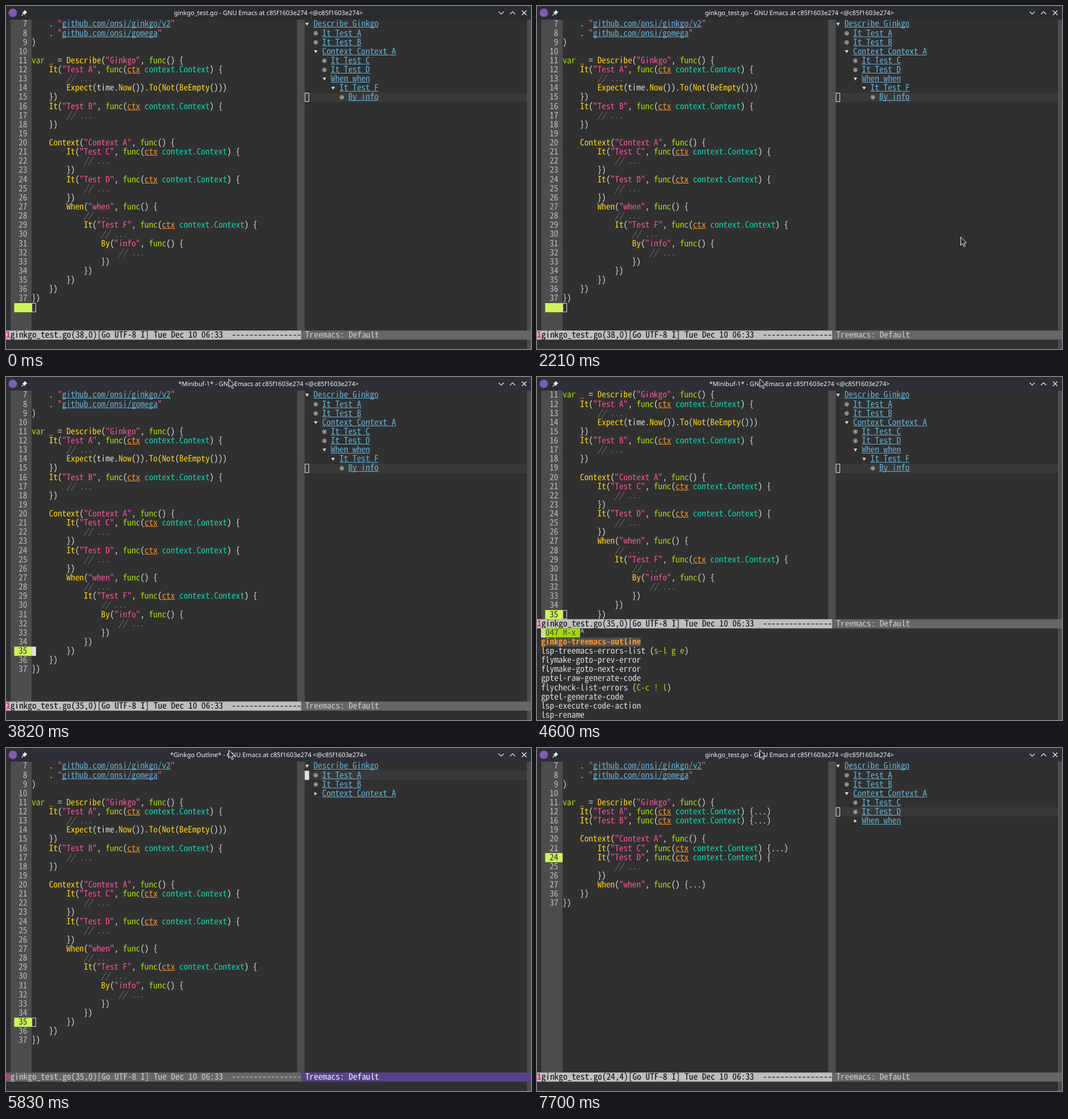
Recreate the animation shown at these times as an HTML page with a canvas. Size 925 by 605 pixels, loop 8000 ms.

```html
<!DOCTYPE html>
<html lang="en">
<head>
<meta charset="utf-8">
<title>Ginkgo outline</title>
<style>
html, body { margin: 0; width: 100%; height: 100%; overflow: hidden; background: #303030; }
canvas { display: block; }
</style>
</head>
<body>
<canvas id="stage" width="925" height="605"></canvas>
<script>
const g = document.getElementById('stage').getContext('2d');
g.textRendering = 'geometricPrecision';

const LOOP = 8000, CW = 7.65, RH = 16.13, TOP = 24;
const CODE_X = 45.2, TREE_X = 526.4, MINI_X = 7.2;
const C = {
  bg: '#303030', bar: '#4d4d4d', hl: '#393939', text: '#dcdcdc', num: '#bcbcbc',
  lime: '#a2dc04', gold: '#ffd60a', pink: '#ff4f9f', orange: '#ff9020',
  teal: '#06d9ae', blue: '#62b2da', comment: '#767676', cursor: '#e4e4e4',
  current: '#cdf652', active: '#bebebe', idle: '#666666', purple: '#58428f'
};
const MONO = '"Noto Sans Mono CJK JP", "Noto Sans Mono CJK SC", "Noto Sans Mono", monospace';
g.font = `100px ${MONO}`;
const SIZE = 100 * CW / g.measureText('M').width;

const FIRST = 7, FOLDED = [12, 16, 21, 27];
const code = `    . "github.com/onsi/ginkgo/v2"
    . "github.com/onsi/gomega"
)

var _ = Describe("Ginkgo", func() {
    It("Test A", func(ctx context.Context) {
        // ...
        Expect(time.Now()).To(Not(BeEmpty()))
    })
    It("Test B", func(ctx context.Context) {
        // ...
    })

    Context("Context A", func() {
        It("Test C", func(ctx context.Context) {
            // ...
        })
        It("Test D", func(ctx context.Context) {
            // ...
        })
        When("when", func() {
            // ...
            It("Test F", func(ctx context.Context) {
                // ...
                By("info", func() {
                    // ...
                })
            })
        })
    })
})`.split('\n');

// depth, icon, label
const A = [1, 'o', 'It Test A'], B = [1, 'o', 'It Test B'];
const CC = [2, 'o', 'It Test C'], D = [2, 'o', 'It Test D'];
const root = open => [0, open, 'Describe Ginkgo'];
const ctxNode = open => [1, open, 'Context Context A'];
const whenNode = open => [2, open, 'When when'];
const trees = {
  full: [root('v'), A, B, ctxNode('v'), CC, D, whenNode('v'), [3, 'v', 'It Test F'], [4, 'o', 'By info']],
  closed: [root('>')],
  top: [root('v'), A, B, ctxNode('>')],
  inner: [root('v'), A, B, ctxNode('v'), CC, D, whenNode('>')]
};
const candidates = [
  'ginkgo-treemacs-outline', 'lsp-treemacs-errors-list (s-l g e)', 'flymake-goto-prev-error',
  'flymake-goto-next-error', 'gptel-raw-generate-code', 'flycheck-list-errors (C-c ! l)',
  'gptel-generate-code', 'lsp-execute-code-action', 'lsp-rename'
];

const rowY = row => TOP + row * RH;
const between = (t, a, b) => t >= a && t < b;
// Latest value whose start time has passed.
const at = (t, steps) => steps.filter(s => s[0] <= t).pop()[1];

function box(x, y, w, h, color) {
  g.fillStyle = color;
  g.fillRect(x, y, w, h);
}

const band = (x, row, w, color) => box(x, rowY(row), w, RH, color);

function put(text, x, row, color, { style = '', underline = false } = {}) {
  const y = rowY(row) + 12.4;
  g.font = `${style} ${SIZE}px ${MONO}`;
  g.fillStyle = color;
  [...text].forEach((ch, i) => ch !== ' ' && g.fillText(ch, x + i * CW, y));
  if (underline) g.fillRect(x, Math.round(y + 1), text.length * CW, 1);
}

function cursor(x, row, kind, ch = ' ') {
  if (kind === 'solid') {
    band(x, row, CW, C.cursor);
    put(ch, x, row, C.bg);
  } else if (kind === 'hollow') {
    g.strokeStyle = C.cursor;
    g.lineWidth = 1;
    g.strokeRect(x + .5, rowY(row) + .5, CW - 1, RH - 1);
  }
}

function line(points, color, width) {
  g.beginPath();
  points.forEach(([x, y]) => g.lineTo(x, y));
  g.strokeStyle = color;
  g.lineWidth = width;
  g.stroke();
}

function poly(points, color) {
  g.beginPath();
  points.forEach(([x, y]) => g.lineTo(x, y));
  g.closePath();
  g.fillStyle = color;
  g.fill();
}

function codeLine(text, row) {
  const tokens = /\/\/.*|"[^"]*"|context\.Context|\w+|\s+|[^\w\s]/g;
  for (const m of text.matchAll(tokens)) {
    const s = m[0], x = CODE_X + m.index * CW;
    if (s.startsWith('//')) put(s, x, row, C.comment, { style: 'italic' });
    else if (s.startsWith('"')) {
      const link = s.includes('/');
      put(link ? '"' + ' '.repeat(s.length - 2) + '"' : s, x, row, C.pink);
      if (link) put(s.slice(1, -1), x + CW, row, C.blue, { underline: true });
    }
    else if (s === 'var' || s === 'func') put(s, x, row, C.lime);
    else if (s === 'ctx') put(s, x, row, C.orange, { underline: true });
    else if (s === '_') put(s, x, row, C.orange);
    else if (s === 'context.Context') put(s, x, row, C.teal);
    else if (/^\w/.test(s) && text[m.index + s.length] === '(') put(s, x, row, C.gold);
    else put(s, x, row, C.text);
  }
}

function editor(t, modeRow) {
  const current = at(t, [[0, 38], [3260, 37], [3450, 36], [3640, 35], [7240, 24]]);
  const kind = at(t, [[0, 'hollow'], [2460, 'solid'], [2960, ''], [3260, 'solid'],
    [3870, 'hollow'], [7240, 'solid'], [7700, '']]);
  const folded = t >= 7240;
  const hidden = n => folded && (between(n, 13, 16) || n === 17 || n === 18 ||
    n === 22 || n === 23 || between(n, 28, 36));
  const start = modeRow < 34 ? 11 : FIRST;

  box(8, TOP, 37, rowY(modeRow) - TOP, C.bar);
  let row = 0;
  for (let n = start; n <= 38 && row < modeRow; n++) {
    if (hidden(n)) continue;
    const text = code[n - FIRST] || '';
    if (n === current) band(14.4, row, 30.8, C.current);
    if (n < 38) put(String(n).padStart(2), 22.2, row, n === current ? '#303030' : C.num);
    // Matching braces of the outer block
    if (between(t, 3390, 3450) && (n === 11 || n === 37))
      band(CODE_X + (n === 11 ? 34 : 0) * CW, row, CW, '#5f5f5f');
    codeLine(folded && FOLDED.includes(n) ? text + '...)' : text, row);
    if (n === current) {
      const col = n === 24 ? 4 : 0;
      cursor(CODE_X + col * CW, row, kind, text[col]);
    }
    row++;
  }

  const on = !between(t, 4650, 7240), ink = on ? '#080808' : '#cecece';
  const pos = current === 24 ? '24,4' : current + ',0';
  band(0, modeRow, 520, on ? C.active : C.idle);
  put('1', 0, modeRow, '#ff1490', { style: 'bold' });
  put(`ginkgo_test.go(${pos})[Go UTF-8 I] Tue Dec 10 06:33  ` + '-'.repeat(16), CW, modeRow, ink);
}

function icon(kind, x, y) {
  if (kind === 'o') {
    g.beginPath();
    g.arc(x, y, 3.2, 0, 7);
    g.strokeStyle = C.text;
    g.lineWidth = 1;
    g.stroke();
    g.beginPath();
    g.arc(x, y, 1.5, 0, 7);
    g.fillStyle = C.text;
    g.fill();
  } else if (kind === 'v') {
    poly([[x - 3.2, y - 2.5], [x + 3.2, y - 2.5], [x, y + 2.8]], C.text);
  } else {
    poly([[x - 2.3, y - 3], [x + 2.8, y], [x - 2.3, y + 3]], C.text);
  }
}

function outline(t, modeRow) {
  const tree = trees[at(t, [[0, 'full'], [4650, 'closed'], [5470, 'top'], [6280, 'inner']])];
  const selected = at(t, [[0, 8], [4650, 0], [5830, 1], [5990, 2], [6160, 3], [6550, 4], [6720, 5]]);
  const kind = at(t, [[0, 'hollow'], [4650, 'solid'], [5120, ''], [5470, 'solid'], [7240, 'hollow']]);
  band(TREE_X, selected, 918 - TREE_X, C.hl);
  tree.forEach(([depth, shape, label], row) => {
    const x = TREE_X + depth * 2 * CW;
    icon(shape, x + 4, rowY(row) + 8);
    put(label, x + 2 * CW, row, C.blue, { underline: true });
  });
  cursor(TREE_X, selected, kind);

  const on = between(t, 4650, 7240);
  band(520, modeRow, 405, on ? C.purple : C.idle);
  put('Treemacs: Default', TREE_X + .8, modeRow, on ? '#f2f2f2' : '#cecece');
}

function minibuffer(t) {
  const leaving = t >= 4600;
  band(MINI_X, 26, 9 * CW, C.lime);
  put('8047 M-x ', MINI_X, 26, '#4d4d4d');
  put('^', MINI_X + 9 * CW, 26, C.text);
  if (leaving) {
    band(MINI_X, 26, CW, C.cursor);
    put('8', MINI_X, 26, C.lime);
  } else if (t < 4330) cursor(MINI_X + 10 * CW, 26, 'solid');

  candidates.forEach((name, i) => {
    const row = 27 + i;
    if (i === 0) {
      band(MINI_X, row, name.length * CW, C.bar);
      put(name, MINI_X, row, C.orange, { style: 'bold' });
      return;
    }
    put(name.replace(/\(.*\)/, s => '(' + ' '.repeat(s.length - 2) + ')'), MINI_X, row, C.text);
    const key = name.indexOf('(') + 1;
    if (key) put(name.slice(key, -1), MINI_X + key * CW, row, C.lime);
  });
}

function titleBar(t) {
  const name = at(t, [[0, 'ginkgo_test.go'], [3820, '*Minibuf-1*'],
    [4650, '*Ginkgo Outline*'], [7190, 'ginkgo_test.go']]);
  const host = 'c85f1603e274', ink = '#f6f6f6';
  box(0, 0, 925, TOP, t < 2460 ? '#292c30' : '#2e2e39');
  g.beginPath();
  g.arc(12, 12, 7.5, 0, 7);
  g.fillStyle = '#7f5ab6';
  g.fill();

  // Pin
  poly([[33, 7], [37.5, 11.5], [36, 12], [34, 14], [33.5, 16], [28.5, 11], [30.5, 10.5], [32.5, 8.5]], ink);
  line([[31, 13.5], [27.5, 17]], ink, 1.1);

  g.font = '11.07px "Noto Sans", sans-serif';
  g.fillStyle = ink;
  g.textAlign = 'center';
  g.fillText(`${name} - GNU Emacs at ${host} <@${host}>`, 462.5, 16);
  g.textAlign = 'left';

  line([[868, 10], [872.5, 14.5], [877, 10]], ink, 1.1);
  line([[888, 14.5], [892.5, 10], [897, 14.5]], ink, 1.1);
  line([[909, 8], [917, 16]], ink, 1.1);
  line([[909, 16], [917, 8]], ink, 1.1);
}

function pointer(t) {
  if (t < 110) return;
  let [x, y] = at(t, [[110, [365, 243]], [160, [610, 335]], [210, [793, 390]], [260, [746, 407]]]);
  if (t >= 2210) {
    const p = Math.min(1, Math.floor((t - 2210) / 50) * 50 / 550);
    const e = 1 - (1 - p) ** 3;
    x += (392 - x) * e;
    y += (3 - y) * e;
  }
  const shape = [[0, 0], [0, 14.5], [3.4, 11.6], [5.6, 16.8], [8, 15.8], [5.8, 10.8], [10, 10.2]]
    .map(([dx, dy]) => [x + dx + .5, y + dy + .5]);
  poly(shape, '#2b2b2b');
  line([...shape, shape[0]], '#f4f4f4', 1);
}

function draw(t) {
  const picking = between(t, 3870, 4650), modeRow = picking ? 25 : 34;
  box(0, 0, 925, 605, C.bg);
  box(513, TOP, 13.4, rowY(modeRow) - TOP, C.bar);
  box(918, TOP, 7, 605 - TOP, C.bar);
  editor(t, modeRow);
  outline(t, modeRow);
  if (picking) minibuffer(t);
  titleBar(t);
  pointer(t);
}

const began = performance.now();
function tick() {
  draw((performance.now() - began) % LOOP);
  requestAnimationFrame(tick);
}
tick();
</script>
</body>
</html>
```
